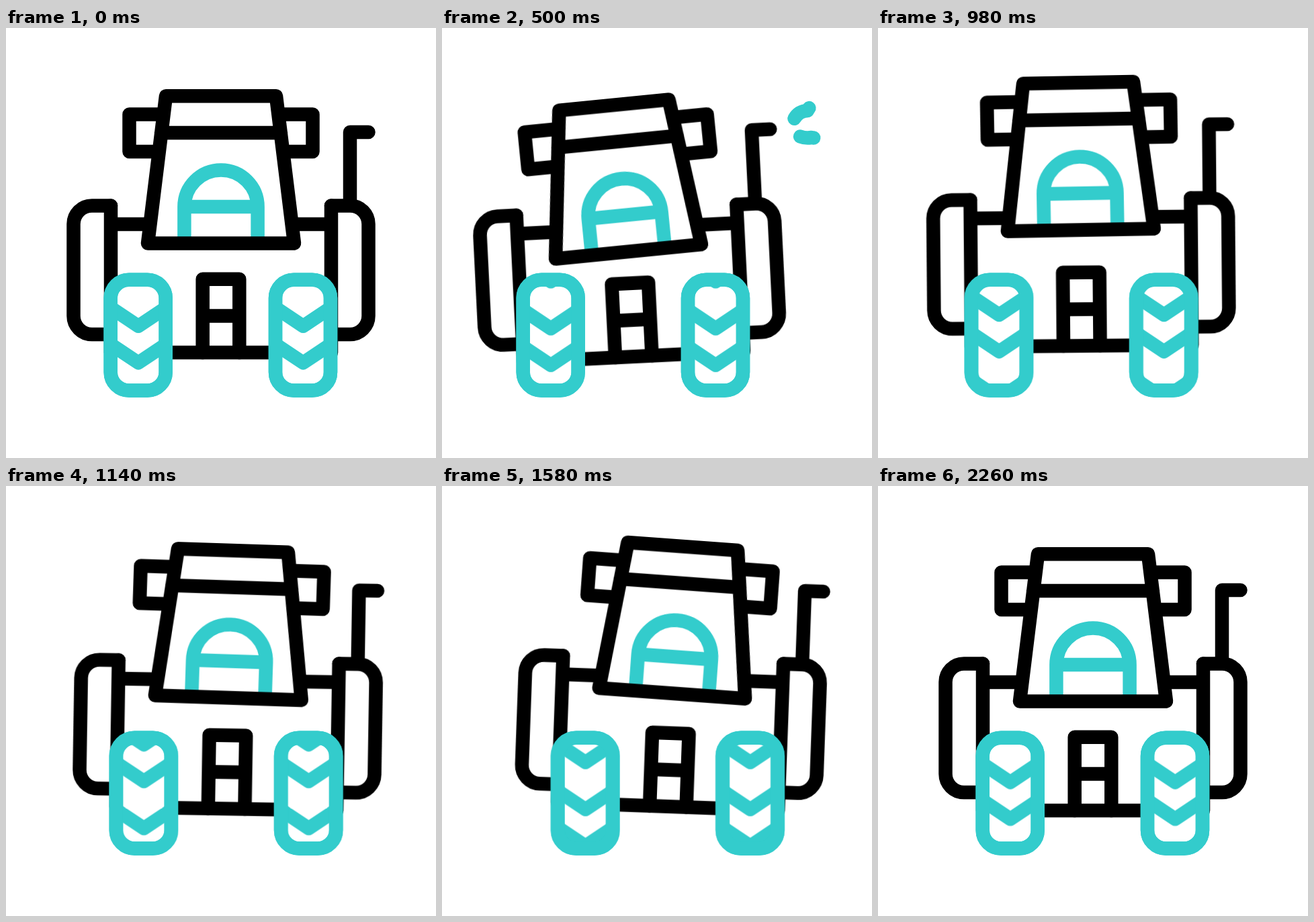
An HTML page without scripts that plays this animation: 640 by 640 pixels, repeating every 2400 ms.

```html
<!DOCTYPE html>
<html lang="en">
<head>
<meta charset="utf-8">
<title>Tractor</title>
<style>
  html, body { margin: 0; width: 100%; height: 100%; overflow: hidden; background: #fff; }
  svg { display: block; width: 100vw; height: 100vh; }
  .line { fill: none; stroke: #000; stroke-width: 20.5; stroke-linecap: round; stroke-linejoin: round; }
  .teal { stroke: #3cc; }
  .solid { fill: #fff; }

  .drive, .bob, .tilt { animation: 2400ms cubic-bezier(.33, 0, .67, 1) infinite; }
  .drive { animation-name: drive; }
  .bob { animation-name: bob; }
  .tilt { animation-name: tilt; }
  .body { transform-origin: 320px 478px; }
  .cab { transform-origin: 320px 320px; }
  .treads { animation: roll 2400ms cubic-bezier(.25, 0, .75, 1) infinite; }
  .puff { animation: puff 2400ms linear infinite; }

  @keyframes drive {
    0%, 80.6%, 100% { transform: translateX(0); }
    29.4% { transform: translateX(-44px); }
    56.2% { transform: translateX(25.3px); }
  }
  @keyframes bob {
    0%, 83.33%, 100% { transform: translateY(0); }
    13.33% { transform: translateY(9.5px); }
    41.67% { transform: translateY(-10px); }
    55% { transform: translateY(7.8px); }
    69.17% { transform: translateY(-8.2px); }
  }
  @keyframes tilt {
    0%, 85.83%, 100% { transform: rotate(0deg); }
    23.75% { transform: rotate(-2.95deg); }
    60% { transform: rotate(2.4deg); }
  }
  @keyframes roll {
    0%, .5% { transform: translateY(0); }
    93.8%, 100% { transform: translateY(869.5px); }
  }
  @keyframes puff {
    0%, 12.99% { visibility: hidden; stroke-dasharray: .1 300; stroke-dashoffset: 0; }
    13% { visibility: visible; stroke-dasharray: .1 300; stroke-dashoffset: 0; }
    22.5% { stroke-dasharray: 26 300; stroke-dashoffset: -9; }
    27.5% { stroke-dasharray: 36 300; stroke-dashoffset: -25; }
    35.83% { stroke-dasharray: 40 300; stroke-dashoffset: -60; }
    39.99% { visibility: visible; stroke-dasharray: .1 300; stroke-dashoffset: -99.9; }
    40%, 100% { visibility: hidden; stroke-dasharray: .1 300; stroke-dashoffset: -99.9; }
  }
</style>
</head>
<body>
<svg viewBox="0 0 640 640">
  <defs>
    <rect id="tyre" x="155.7" y="374.8" width="82" height="164.8" rx="27.3"/>
    <path id="tread1" d="M151 413l46 30.7 46-30.7M151 467.6l46 30.7 46-30.7"/>
    <g id="tread2"><use href="#tread1"/><use href="#tread1" y="-124.6"/></g>
    <g id="tread4"><use href="#tread2"/><use href="#tread2" y="-249.2"/></g>
    <g id="tread8"><use href="#tread4"/><use href="#tread4" y="-498.4"/></g>
    <clipPath id="tyres">
      <use href="#tyre"/>
      <use href="#tyre" x="245.3"/>
    </clipPath>
  </defs>

  <g class="line teal">
    <path class="puff" pathLength="100" d="M521 144Q526 124 544 123Q550 111 563 112Q561 97 565 82Q567 56 592 52"/>
    <path class="puff" pathLength="100" d="M527 158Q536 165 550 163Q566 166 579 157Q602 155 609 135"/>
  </g>

  <g class="drive line">
    <g class="bob">
      <g class="tilt body">
        <path d="M156 292H484M156 264.5V483H484V264.5"/>
        <path d="M156 264.5H127.8A27.3 27.3 0 0 0 100.5 291.8V428.6A27.3 27.3 0 0 0 127.8 455.9H160"/>
        <path d="M484 264.5H512.2A27.3 27.3 0 0 1 539.5 291.8V428.6A27.3 27.3 0 0 1 512.2 455.9H480"/>
        <path d="M512 260V155H539.5"/>
        <path d="M292.7 483V373.8H347.3V483M292.7 428.5H347.3"/>
        <g class="bob">
          <g class="tilt cab">
            <path d="M228 128.5H183.5V184H222M412 128.5H456.5V184H418"/>
            <path class="solid" stroke="none" d="M238 101H402L429 320.5H211Z"/>
            <path class="teal" d="M265.4 318V266A54.6 54.6 0 0 1 374.6 266V318M265.4 266H374.6"/>
            <path d="M238 101.2H402L429 320.5H211ZM231 156H409"/>
          </g>
        </g>
      </g>
    </g>
    <g class="teal">
      <g class="solid">
        <use href="#tyre"/>
        <use href="#tyre" x="245.3"/>
      </g>
      <g clip-path="url(#tyres)">
        <g class="treads">
          <use href="#tread8"/>
          <use href="#tread8" x="245.3"/>
        </g>
      </g>
      <use href="#tyre"/>
      <use href="#tyre" x="245.3"/>
    </g>
  </g>
</svg>
</body>
</html>
```
